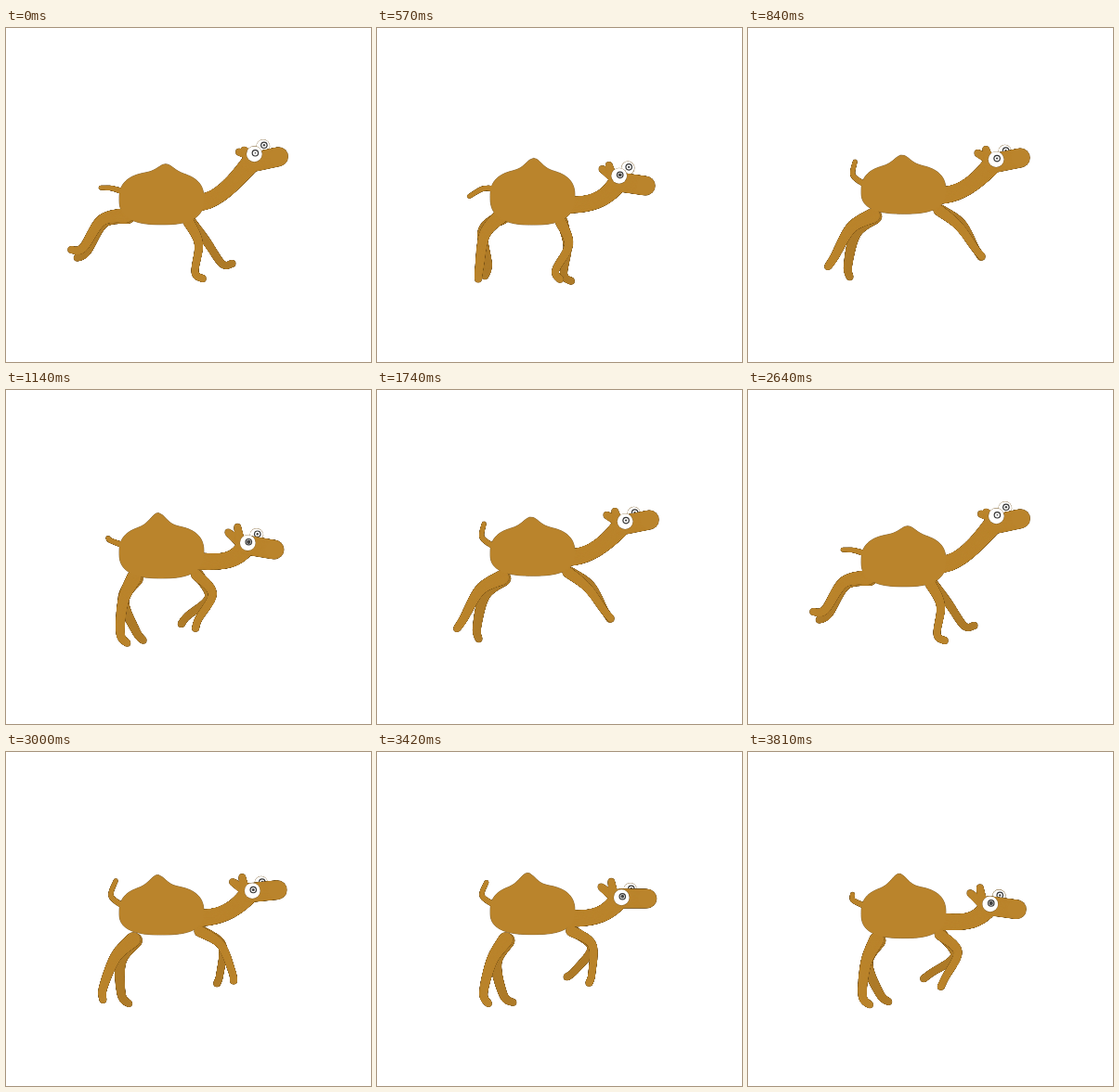
An HTML page with a canvas for the animation above (3.93 s loop, 393 by 360 pixels).

```html
<!DOCTYPE html>
<html lang="en">
<head>
<meta charset="utf-8">
<title>Galloping camel</title>
<style>
html, body { margin: 0; width: 100%; height: 100%; overflow: hidden; background: #fff; }
canvas { display: block; }
</style>
</head>
<body>
<canvas id="stage" width="393" height="360"></canvas>
<script>
const ctx = document.getElementById('stage').getContext('2d');
const TAN = '#ba842c', SHADE = '#ae7b29', INK = '#72501a';
const TAU = Math.PI * 2;
const LOOP = 3930, STEP = 30, LAST = 127, RESTART = 88, STRIDE = 15;

// The stride runs fastest while the legs are stretched out.
function stride(step) {
  const p = step / STRIDE;
  return p + 0.08 * (Math.sin(TAU * (p + 0.05)) - Math.sin(TAU * 0.05));
}

const waver = q => (mid, amp, peak, speed = 1) =>
  mid + amp * Math.cos(TAU * speed * (q - peak));

function disc(x, y, r, color) {
  ctx.fillStyle = color;
  ctx.beginPath();
  ctx.arc(x, y, r, 0, TAU);
  ctx.fill();
}

// Points are [x, y, radius].
function limb(points, color, grow) {
  for (let i = 1; i < points.length; i++) {
    const [x0, y0, r0] = points[i - 1], [x1, y1, r1] = points[i];
    const steps = Math.ceil(Math.hypot(x1 - x0, y1 - y0) * 2) || 1;
    for (let s = 0; s <= steps; s++) {
      const t = s / steps;
      disc(x0 + (x1 - x0) * t, y0 + (y1 - y0) * t, r0 + (r1 - r0) * t + grow, color);
    }
  }
}

// Smooth curve through the points.
function spline(points) {
  const get = i => points[Math.max(0, Math.min(points.length - 1, i))];
  const out = [];
  for (let i = 0; i < points.length - 1; i++) {
    const [a, b, c, d] = [-1, 0, 1, 2].map(k => get(i + k));
    for (let t = 0; t < 1; t += 0.125) {
      out.push(b.map((_, k) => b[k] + t / 2 * (c[k] - a[k] +
        t * (2 * a[k] - 5 * b[k] + 4 * c[k] - d[k] + t * (3 * (b[k] - c[k]) + d[k] - a[k])))));
    }
  }
  return [...out, get(points.length)];
}

// Each bone is [length, degrees forward from straight down, end radius].
function leg(x, y, radius, bones) {
  const joints = [[x, y, radius]];
  for (const [length, degrees, r] of bones) {
    const angle = degrees * Math.PI / 180;
    x += length * Math.sin(angle);
    y += length * Math.cos(angle);
    joints.push([x, y, r]);
  }
  return spline(joints);
}

function foreLeg(wave, hipX, hipY, lag, shinWave) {
  const thigh = wave(35, 23, 0.68 + lag);
  const shin = wave(...shinWave) + wave(0, 12.5, 0.31, 2);
  const foot = shin + wave(30, 46, 0.15);
  return leg(hipX, hipY, 5.5, [[27, thigh, 4.2], [31, shin, 3.5], [11, foot, 3.5]]);
}

function hindLeg(wave, hipX, hipY, lag, shinWave, footMid) {
  const thigh = wave(-52, 27, 0.5 + lag);
  const foot = wave(footMid, 60, 0.52 + lag);
  return leg(hipX, hipY, 7.5, [[27, thigh, 5.5], [36, wave(...shinWave), 4.2], [13, foot, 3.4]]);
}

// Rounded barrel with one hump.
function torso(top, belly, humpX, humpHeight) {
  const power = 2 / 2.6, midY = top + 29, path = new Path2D();
  for (let a = 0; a < TAU; a += 0.04) {
    const c = Math.cos(a), s = Math.sin(a);
    const x = 167.5 + 45.5 * Math.sign(c) * Math.abs(c) ** power;
    const lift = s < 0 ? 29.5 : belly - midY;
    const hump = s < 0 ? humpHeight * Math.exp(-(((x - humpX) / 11) ** 2)) : 0;
    path.lineTo(x, midY + lift * Math.sign(s) * Math.abs(s) ** power - hump);
  }
  path.closePath();
  return path;
}

function eye(x, y, r, dot) {
  disc(x, y, r + 0.3, INK);
  disc(x, y, r, '#fff');
  disc(x + 1, y - 1, 3.8, '#333');
  disc(x + 1, y - 1, 2.6, '#fff');
  disc(x + 1, y - 1, dot, '#444');
}

function drawCamel(q) {
  const wave = waver(q);
  const nod = wave(0, 1, 0.41);
  const top = wave(150.5, 7, 0.12), belly = wave(206.5, 10, 0.16);

  const foreX = wave(201, 8, 0.64), foreY = belly - 4;
  const hindX = wave(134, 5, 0.57), hindY = 202;
  const farLegs = [
    hindLeg(wave, hindX + 2, hindY + 1, 0.07, [-4, 26, 0.49], -5),
    foreLeg(wave, foreX + 2, foreY, 0.1, [0, 44, 0.99])
  ];

  const skull = [262 - 2.5 * nod, 155.5 + 12.5 * nod, 10];
  const snout = [skull[0] + 29.5, skull[1] - 1 + 6.3 * nod, 10];
  const baseY = top + 35 + 3 * nod;
  const neck = [];
  for (let t = 0; t <= 1; t += 0.1) {
    const u = 1 - t;
    const bezier = (a, b, c, d) => a * u ** 3 + 3 * b * u * u * t + 3 * c * u * t * t + d * t ** 3;
    neck.push([
      bezier(204, 227, 246, skull[0]),
      bezier(baseY, baseY + 1, skull[1] + 21, skull[1]),
      bezier(9, 8, 8, 10)
    ]);
  }

  const eyeX = skull[0] + 2 - 1.5 * nod, eyeY = skull[1] + wave(-5.5, 4.5, 0.6);
  const ear = (dx, dy) => [[eyeX - 8, eyeY, 5], [eyeX + dx, eyeY + dy, 3.4]];

  const tailY = top + 20, rise = wave(-7, 19, 0.22);
  const tail = spline([
    [124, tailY, 2.6],
    [113, tailY - 2 + 0.3 * rise, 2.3],
    [wave(107, 11.5, 0.68), tailY + rise, 2.1]
  ]);

  const nearParts = [
    tail,
    hindLeg(wave, hindX, hindY, 0, [-20, 15, 0.44], -22),
    foreLeg(wave, foreX, foreY, 0, [-8, 32, 0.8]),
    [...neck, skull, snout],
    ear(wave(-19, 3, 0.1), wave(-7, 5, 0.05)),
    ear(-11, wave(-11, 7, 0.05))
  ];
  const body = torso(top, belly, wave(167.5, 5.5, 0.1), wave(11, 2.5, 0.5));
  const paint = [[INK, 0.35], [TAN, 0]];

  for (const part of farLegs) {
    limb(part, INK, 0.35);
    limb(part, SHADE, 0);
  }
  eye(eyeX + 9.5, eyeY - 8.5, 7, 1.2);
  for (const [color, grow] of paint) {
    nearParts.forEach(part => limb(part, color, grow));
    ctx.fillStyle = ctx.strokeStyle = color;
    ctx.lineWidth = grow * 2 || 0.01;
    ctx.fill(body);
    ctx.stroke(body);
  }
  eye(eyeX, eyeY, 8.4, wave(1.5, 0.7, 0.47));
}

function frame() {
  const step = Math.min(LAST, Math.floor(performance.now() % LOOP / STEP));
  ctx.fillStyle = '#fff';
  ctx.fillRect(0, 0, 393, 360);
  drawCamel(stride((step < RESTART ? step : step - RESTART) % STRIDE));
  requestAnimationFrame(frame);
}
frame();
</script>
</body>
</html>
```
